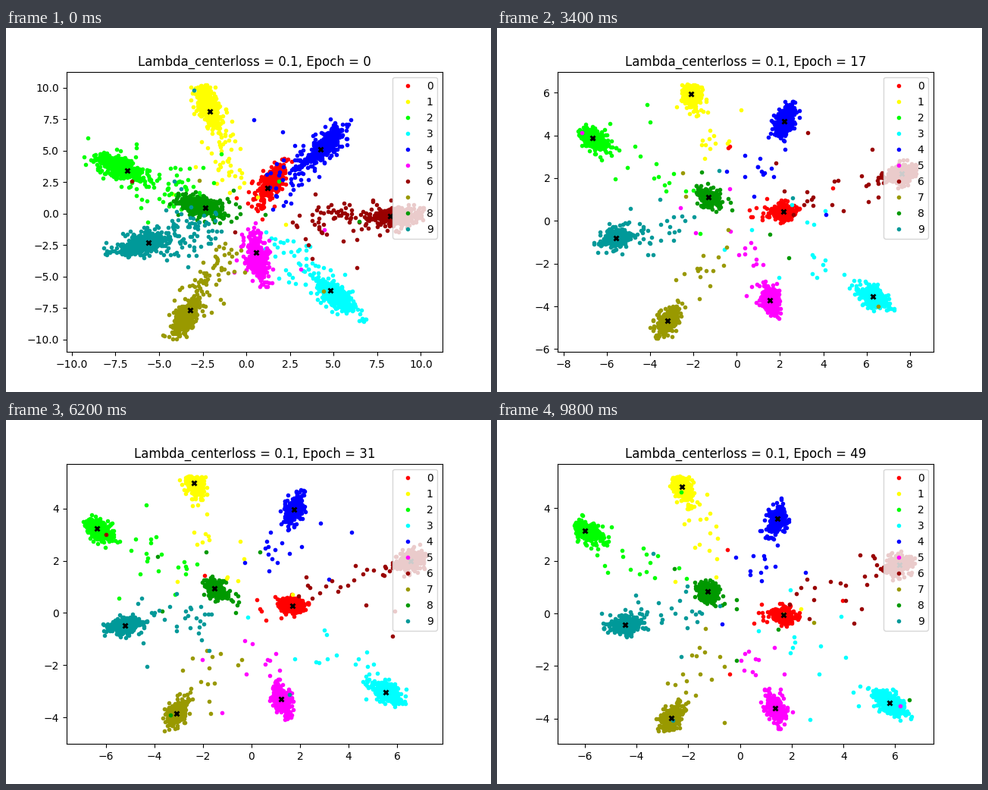
Recreate the animation shown at these times as a matplotlib script. Size 640 px wide and 480 px high, loop 10 s.

```python
import numpy as np
import matplotlib.pyplot as plt
from matplotlib.animation import FuncAnimation

EPOCHS = 50
CORE = 480                              # points in each cluster core
LEFT, TOP, WIDTH, HEIGHT = 80, 57.6, 496, 369.6
HUB = np.array([320, 250])              # stage point the tails reach for

# Axis limits (x0, x1, y0, y1) at a few epochs
LIMIT_EPOCHS = [0, 7, 12, 21, 31, 37, 49]
LIMITS = [(-10.30, 11.24, -10.98, 11.26), (-10.23, 10.14, -7.05, 8.59),
          (-8.882, 9.73, -6.216, 7.983), (-7.78, 8.58, -6.07, 6.18),
          (-7.61, 7.87, -5.02, 5.72), (-6.92, 7.42, -5.49, 6.13),
          (-7.05, 7.48, -4.97, 5.70)]

# Per class: colour, tail weight, path of its centre in stage pixels
PATH_EPOCHS = [0, 7, 21, 49]
CLASSES = [
    ("#ff0000", 0.6, [(345, 211), (378, 251), (378, 238), (378, 257)]),
    ("#ffff00", 0.8, [(269, 110), (269, 103), (251, 80), (244, 88)]),
    ("#00ff00", 1.0, [(160, 188), (136, 153), (122, 142), (116, 146)]),
    ("#00ffff", 0.7, [(428, 346), (507, 363), (492, 351), (518, 373)]),
    ("#0000ff", 1.0, [(415, 160), (365, 152), (385, 111), (370, 130)]),
    ("#ff00ff", 0.8, [(330, 296), (358, 353), (361, 362), (367, 380)]),
    ("#990000", 1.0, [(507, 248), (531, 214), (535, 183), (531, 191)]),
    ("#999900", 0.9, [(243, 372), (234, 391), (222, 384), (230, 393)]),
    ("#009900", 0.7, [(263, 237), (290, 231), (274, 220), (278, 226)]),
    ("#009999", 1.6, [(188, 283), (173, 290), (151, 272), (169, 270)]),
]


def at(epoch, epochs, values):
    """Linear blend between key values."""
    return np.array([np.interp(epoch, epochs, v) for v in np.transpose(values)])


def core(rng, center, epoch, n=CORE):
    """Ragged ellipse stretched along the line to the hub, tighter with time."""
    ray = center - HUB
    dist = np.hypot(*ray)
    out = ray / dist
    side = np.array([-out[1], out[0]])
    early = np.exp(-epoch / 4)
    long = (5 + 0.022 * dist) * (1 + 0.8 * early)
    short = 3 + 0.2 * long
    u, v = 0.85 * np.clip(rng.standard_t(6, (2, n, 1)), -4, 4)
    return center + out * (10 * early + u * long) + side * v * short


def tail(rng, center, epoch, weight):
    """Loose points trailing from a cluster towards the hub."""
    n = int(weight * (18 + 45 * np.exp(-epoch / 4)))
    t = rng.uniform(0.05, 0.65, (n, 1))
    spread = 5 + 0.06 * np.hypot(*(center - HUB))
    return center + t * (HUB - center) + rng.normal(size=(n, 2)) * spread


def strays(rng, centers, k, epoch):
    """A few points between clusters, and one inside another cluster."""
    others = rng.integers(0, len(CLASSES), 5)
    t = rng.uniform(0.2, 0.65, (4, 1))
    between = centers[k] * (1 - t) + centers[others[:4]] * t
    inside = core(rng, centers[others[4]], epoch, 1)
    return np.vstack([between + rng.normal(size=(4, 2)) * 6, inside])


def to_data(points, lims):
    """Stage pixels to data, keeping the usual 5 % margin free."""
    u = (points[:, 0] - LEFT) / WIDTH
    v = 1 - (points[:, 1] - TOP) / HEIGHT
    keep = (abs(u - 0.5) < 0.455) & (abs(v - 0.5) < 0.455)
    x0, x1, y0, y1 = lims
    return x0 + u[keep] * (x1 - x0), y0 + v[keep] * (y1 - y0)


fig, ax = plt.subplots(figsize=(6.4, 4.8), dpi=100)
dots = [ax.plot([], [], ".", c=c[0], label=str(k))[0] for k, c in enumerate(CLASSES)]
crosses, = ax.plot([], [], "kx", mew=2, ms=4)
ax.legend(handles=dots, loc="upper right")
title = ax.set_title("")


def draw(epoch):
    rng = np.random.default_rng(100 + epoch)
    lims = at(epoch, LIMIT_EPOCHS, LIMITS)
    centers = np.array([at(epoch, PATH_EPOCHS, path) for _, _, path in CLASSES])
    ax.set_xlim(lims[:2])
    ax.set_ylim(lims[2:])
    for k, (_, weight, _) in enumerate(CLASSES):
        points = np.vstack([core(rng, centers[k], epoch),
                            tail(rng, centers[k], epoch, weight),
                            strays(rng, centers, k, epoch)])
        dots[k].set_data(*to_data(points, lims))
    crosses.set_data(*to_data(centers, lims))
    title.set_text(f"Lambda_centerloss = 0.1, Epoch = {epoch}")
    return [*dots, crosses, title]


anim = FuncAnimation(fig, draw, frames=EPOCHS, interval=200, repeat=True, blit=False)
plt.show()
```
